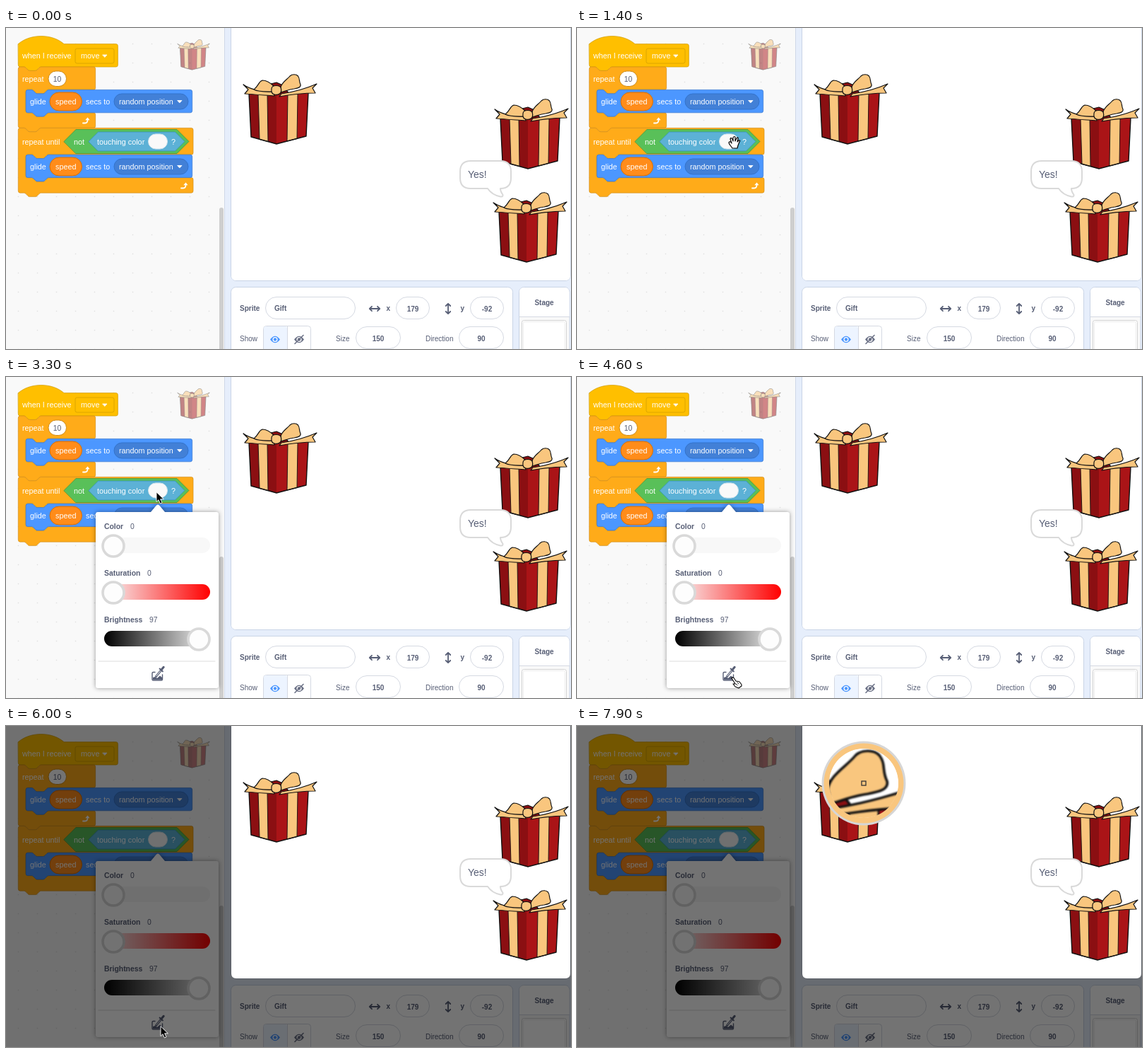
Recreate the animation shown at these times as an HTML page. Size 800 px wide and 454 px high, loop 8 s.

```html
<!DOCTYPE html>
<html lang="en">
<head>
<meta charset="utf-8">
<title>Picking a color</title>
<style>
html, body { margin: 0; width: 100%; height: 100%; overflow: hidden; background: #e6eefb; }
svg { display: block; }
text { font: 10px "Liberation Sans", Arial, sans-serif; fill: #575e75; }
.b { font-weight: bold; }
.w { font-size: 10.8px; fill: #fff; }
.p { font-size: 10.4px; }
#shade, #loupe, #cursor { pointer-events: none; }
#picker { filter: drop-shadow(0 0 3px rgba(0, 0, 0, .4)); }
#lens { filter: blur(.35px); }
</style>
</head>
<body>
<svg id="root" width="800" height="454" viewBox="0 0 800 454"></svg>
<script>
const $ = id => document.getElementById(id);

// ---- small drawing helpers ----
const path = (d, fill, stroke = 'none', w = 1) =>
  `<path d="${d}" fill="${fill}" stroke="${stroke}" stroke-width="${w}" stroke-linejoin="round" stroke-linecap="round"/>`;
const box = (x, y, w, h, r, fill, stroke = 'none') =>
  `<rect x="${x}" y="${y}" width="${w}" height="${h}" rx="${r}" fill="${fill}" stroke="${stroke}"/>`;
const text = (x, y, s, cls = '', anchor = 'start') =>
  `<text x="${x}" y="${y}" class="${cls}" text-anchor="${anchor}">${s}</text>`;
const at = (x, y, s, scale = 1) => `<g transform="translate(${x} ${y}) scale(${scale})">${s}</g>`;

// ---- gift ----
const PEACH = '#f9c67e', RED = '#aa1417', DARK = '#8b0f12', INK = '#111';
const gift =
  path('M27 27L39 13L47 11L56 15L65 27Z', DARK, INK, 1.2) +
  path('M8 27L11 88L47 98L89 87L92 26Z', RED) +
  path('M8 27L11 88L23 91.5L21 27Z', DARK) +
  path('M34 28V94.5L47 98V28Z', DARK) +
  path('M21 27L23 91.5L35 94.5L34 28Z', PEACH, INK, .9) +
  path('M63 27L62 94L76 90.5L77 27Z', PEACH, INK, .9) +
  path('M8 27L11 88L47 98L89 87L92 26', 'none', INK, 1.4) +
  path('M0 14C10 21 26 24 43 24L44 30C30 29 14 28 2 27L7 21Z', PEACH, INK, 1.2) +
  path('M54 27C68 25 88 20 104 13L98 19L102 26C88 26 68 28 51 31Z', PEACH, INK, 1.2) +
  path('M44 17C39 12 34 8 27 8C21 10 22 16 15 21C22 25 34 24 44 24Z', PEACH, INK, 1.2) +
  path('M53 18C54 11 62 7 66 2C69-1 75-1 77.5 2C80.5 6 78.5 9 81 14C82 18 77 19 72 20C64 21 58 24 53 25Z', PEACH, INK, 1.2) +
  path('M40 20C40 14 53 14 53.5 20C55 28 48 29 44 28Q39 27 40 20Z', PEACH, INK, 1.2);

// ---- code blocks, in units of .675 px ----
const NOTCH = 'c2 0 3 1 4 2l4 4c1 1 2 2 4 2h12c2 0 3-1 4-2l4-4c1-1 2-2 4-2';
const BACK = 'c-2 0-3 1-4 2l-4 4c-1 1-2 2-4 2h-12c-2 0-3-1-4-2l-4-4c-1-1-2-2-4-2';
const TOP = 'M0 4a4 4 0 0 1 4-4h8' + NOTCH, END = `a4 4 0 0 1-4 4H48${BACK}H4a4 4 0 0 1-4-4z`;
const stack = w => `${TOP}H${w - 4}a4 4 0 0 1 4 4v40${END}`;
const loop = (w, head) => `${TOP}H${w - 4}a4 4 0 0 1 4 4V${head - 4}a4 4 0 0 1-4 4H64${BACK}h-8` +
  `a4 4 0 0 0-4 4v40a4 4 0 0 0 4 4h8${NOTCH}H${w - 4}a4 4 0 0 1 4 4v24${END}`;
const hat = 'M0 0c25-22 71-22 96 0H205a4 4 0 0 1 4 4v40' + END;
const hex = (x, y, w, h, fill, stroke) =>
  path(`M${x} ${y}l${h}-${h}h${w - 2 * h}l${h} ${h}l-${h} ${h}h-${w - 2 * h}z`, fill, stroke, .7);
const caret = (x, y) => path(`M${x - 3} ${y - 1.5}h6l-3 3.2z`, '#fff', '#fff', .8);
const turn = (x, y) => at(x, y,
  path('M-4 3.5H-1Q2.5 3.5 2.5 -1', 'none', '#fff', 1.8) + path('M-.8 -.8L2.5-4.5L5.6-.8Z', '#fff'));

const glide = y =>
  box(62, y - 13, 45.5, 26, 13, '#ff8c1a', '#db6e00') +
  box(153, y - 11, 105, 22, 11, '#4280d7', '#3373cc') +
  text(34, y + 4, 'glide', 'w') + text(70, y + 4, 'speed', 'w') +
  text(113, y + 4, 'secs to', 'w') + text(160, y + 4, 'random position', 'w') + caret(246, y);

const blocks =
  at(17.3, 22.6,
    at(0, 0, path(hat, '#ffbf00', '#cc9900')) +
    at(0, 48, path(loop(162, 48), '#ffab19', '#cf8b17')) +
    at(16, 96, path(stack(349), '#4c97ff', '#3373cc')) +
    at(0, 176, path(loop(367, 56), '#ffab19', '#cf8b17')) +
    at(16, 232, path(stack(349), '#4c97ff', '#3373cc')), .675) +
  box(98, 29, 55, 21, 2.7, '#ffbf00', '#dca600') +
  text(23, 43, 'when I receive', 'w') + text(106, 43, 'move', 'w') + caret(140, 39.5) +
  box(60, 61, 25.5, 21.5, 10.7, '#fff', '#cf8b17') +
  text(23, 76, 'repeat', 'w') + text(72.5, 76, '10', 'p', 'middle') +
  glide(104) + turn(113, 131) +
  hex(82, 160.5, 177, 17, '#59c059', '#389438') + hex(117, 160.5, 136, 13.5, '#5cb1d6', '#2e8eb8') +
  text(23, 164.5, 'repeat until', 'w') + text(96, 164.5, 'not', 'w') +
  text(129, 164.5, 'touching color', 'w') + text(234, 164.5, '?', 'w') +
  box(201.5, 150, 27, 21, 10.5, '#f9f9f9', '#d5e6ee') +
  glide(196) + turn(252, 223);

// ---- sprite and stage panels ----
const field = (x, y, w, s) => box(x + .5, y, w, 31, 15.5, '#fff', '#d5d9e2') +
  text(x + w / 2 + .5, y + 20, s, 'b', 'middle');
const eye = (x, c) => path(`M${x - 7} 440.5Q${x} 431 ${x + 7} 440.5Q${x} 450 ${x - 7} 440.5Z`, c) +
  `<circle cx="${x}" cy="440.5" r="2.9" fill="${c}" stroke="#fff" stroke-width="1.3"/>`;
const arrows = path('M-7 0H7M-4-3.2L-7.2 0L-4 3.2M4-3.2L7.2 0L4 3.2', 'none', '#575e75', 1.8);
const panels =
  box(318.5, 366.5, 399, 100, 7, '#fff', '#c9d4e6') +
  text(331, 400, 'Sprite', 'b') +
  box(367.5, 380.5, 127, 31, 15.5, '#fff', '#d5d9e2') + text(380, 400, 'Gift', 'b') +
  at(522, 397, arrows) + text(538.5, 400, 'x', 'b') + field(552, 380.5, 47, '179') +
  `<g transform="translate(626 397) rotate(90)">${arrows}</g>` +
  text(643.5, 400, 'y', 'b') + field(657, 380.5, 47, '-92') +
  text(331, 443, 'Show') + box(364.5, 421.5, 67, 40, 4, '#fff', '#d5d9e2') +
  box(365, 422, 33, 40, 3, '#edf4ff') + path('M398.5 422V454', 'none', '#d5d9e2') +
  eye(381, '#4c97ff') + eye(415, '#6b7186') + path('M409 446.5L421 434.5', 'none', '#6b7186', 1.6) +
  text(467, 443, 'Size') + field(495, 422.5, 63, '150') +
  text(594, 443, 'Direction') + field(641, 422.5, 63, '90') +
  box(726.5, 366.5, 71.5, 100, 7, '#f9f9f9', '#c9d4e6') +
  path('M727 408.5V374Q727 367 734 367H791Q797.5 367 797.5 374V408.5Z', '#fff') +
  path('M727 408.5H798', 'none', '#d5d9e2') + text(762, 392, 'Stage', 'b', 'middle') +
  box(730.5, 413.5, 63, 60, 3, '#fff', '#d2d2d2') + box(732.5, 415.5, 59, 60, 2, '#fff', '#ececec');

// ---- color picker ----
const slider = (y, name, value, valueX, fill, knob) =>
  text(139, y - 24, name, 'b p') + text(valueX, y - 24, value, 'p') +
  box(139, y - 12, 150, 22, 11, fill) +
  `<circle cx="${knob}" cy="${y}" r="15" fill="#fdfdfd" stroke="#d9d9d9" stroke-width="3.6"/>`;
const picker =
  path('M130 191H205L212.5 182Q215 179 217.5 182L225 191H298Q301 191 301 194V437Q301 440 298 440H130Q127 440 127 437V194Q127 191 130 191Z', '#fff') +
  slider(239, 'Color', 0, 176, '#f8f8f8', 152) +
  slider(305, 'Saturation', 0, 200, 'url(#sat)', 152) +
  slider(371, 'Brightness', 97, 203, 'url(#bri)', 273) +
  path('M131 402H296', 'none', '#dcdcdc') +
  path('M211 417.5H208.5Q207 417.5 207 419V427.5Q207 429 208.5 429H220Q221.5 429 221.5 427.5V421', 'none', '#575e75', 1.4) +
  path('M208 428V425L211 424L214 426L218 422.5L221 425V428Z', '#575e75') +
  path('M212.5 423.5L219.5 415', 'none', '#575e75', 2.8) + path('M213 422.8L219 415.6', 'none', '#fff', 1) +
  path('M217.5 412.5L222 416.5', 'none', '#575e75', 1.8) + path('M220.5 413.5L223.2 410.3', 'none', '#575e75', 3);

// ---- stage ----
const bubble =
  path('M658 188H700Q715 188 715 203V212Q715 227 700 227Q700 231 703.5 236Q704 239 700 238.5Q688 236 682 227H658Q643 227 643 212V203Q643 188 658 188Z', '#fff', '#d9d9d9', 2) +
  '<text x="654" y="212" style="font-size:14px">Yes!</text>';
const stage =
  path('M319 0H799V350Q799 357 792 357H326Q319 357 319 350Z', '#fff') +
  at(336, 66, gift) + at(692, 101, gift) + at(690, 233, gift) + bubble;

// ---- cursors ----
const cursors = {
  arrow: path('M0 0V13.5L3 10.7L5.4 16L8 14.8L5.6 9.8H10Z', '#000', '#fff', .9),
  grab: path('M-3 8C-5 5-8 2-8 0C-7-2-5-1-4 1L-6-5C-5-8-3-6-2-2V-7C-1-9 1-9 1-7V-2L3-6C4-8 6-7 5-5L4-1L6-3C8-4 8-2 7-1L5 4L4 8Z', '#fff', '#000', 1.2),
  point: path('M0 1C1-1 3 0 4 2L6 5L11 6L14 10V12L10 15L5 13L2 9L5 9Z', '#fff', '#000', 1.1) +
    path('M8 7L10 9M6 9L8 11', 'none', '#000', .9)
};

$('root').innerHTML = `
<defs>
  <linearGradient id="sat"><stop stop-color="#f7f7f7"/><stop offset="1" stop-color="#f00"/></linearGradient>
  <linearGradient id="bri"><stop stop-color="#000"/><stop offset="1" stop-color="#f7f7f7"/></linearGradient>
  <pattern id="dots" width="27" height="27" patternUnits="userSpaceOnUse" x="4" y="9">
    <rect x="12.8" y="12.8" width="1.4" height="1.4" fill="#dedede"/></pattern>
  <clipPath id="round"><circle r="49"/></clipPath>
</defs>
${box(0, 0, 800, 454, 0, '#e6eefb')}
${box(-5, -5, 314.5, 470, 0, '#f9f9f9', '#cfd8e8')}${box(0, 0, 309, 454, 0, 'url(#dots)')}
${blocks}
<g opacity=".5">${at(243, 16.5, gift, .435)}</g>
${box(302, 254, 6, 210, 3, '#cecece')}
${panels}
${box(318.5, -10, 481, 367.5, 7.5, '#fff', '#c9d4e6')}
<g id="picker">${picker}</g>
<rect id="shade" width="800" height="454" fill="#000" opacity=".55"/>
<g id="stage">${stage}</g>
<g id="loupe">
  <circle r="59.5" fill="#d6d6d6"/><circle id="ring" r="56.5"/>
  <g clip-path="url(#round)"><circle r="49" fill="#fff"/><use id="lens" href="#stage"/></g>
  <rect id="spot" x="-3" y="-3" width="6" height="6" stroke="#333" stroke-width="1.3"/>
</g>
<g id="cursor"></g>`;

// ---- motion ----
const LOOP = 8000, ENTER = 850, OPEN = 2200, PICK = 5600;
const route = [
  [ENTER, 285, 440], [1350, 223, 162], [1600, 223, 162], [1950, 213, 163], [3600, 213, 163],
  [4400, 219, 425], [6300, 219, 425], [7000, 404, 107], [7300, 404, 107], [7800, 406, 81], [LOOP, 406, 81]
];

function place(t) {
  const i = Math.max(1, route.findIndex(k => k[0] > t));
  const [t0, x0, y0] = route[i - 1], [t1, x1, y1] = route[i];
  const u = Math.min(1, Math.max(0, (t - t0) / (t1 - t0))), e = u * u * (3 - 2 * u);
  return [x0 + (x1 - x0) * e, y0 + (y1 - y0) * e];
}

let shape;
function draw(now) {
  const t = now % LOOP, [x, y] = place(t), picking = t >= PICK;
  const zoom = picking && x > 319 && y < 357;
  const show = (id, on) => $(id).style.display = on ? '' : 'none';

  show('picker', t >= OPEN);
  $('picker').style.opacity = Math.min(1, (t - OPEN) / 200);
  show('shade', picking);
  show('loupe', zoom);
  show('cursor', t >= ENTER && !zoom);

  const next = t < OPEN && y < 234 ? 'grab' : !picking && y > 403 && t > OPEN ? 'point' : 'arrow';
  if (next !== shape) $('cursor').innerHTML = cursors[shape = next];
  $('cursor').setAttribute('transform', `translate(${x} ${y})`);

  if (zoom) {
    const hit = document.elementFromPoint(x, y);
    const color = hit && hit.getAttribute('fill') || '#fff';
    $('ring').setAttribute('fill', color);
    $('spot').setAttribute('fill', color);
    $('loupe').setAttribute('transform', `translate(${x} ${y})`);
    $('lens').setAttribute('transform', `scale(3) translate(${-x} ${-y})`);
  }
}

const start = performance.now();
(function frame() {
  draw(performance.now() - start);
  requestAnimationFrame(frame);
})();
</script>
</body>
</html>
```
